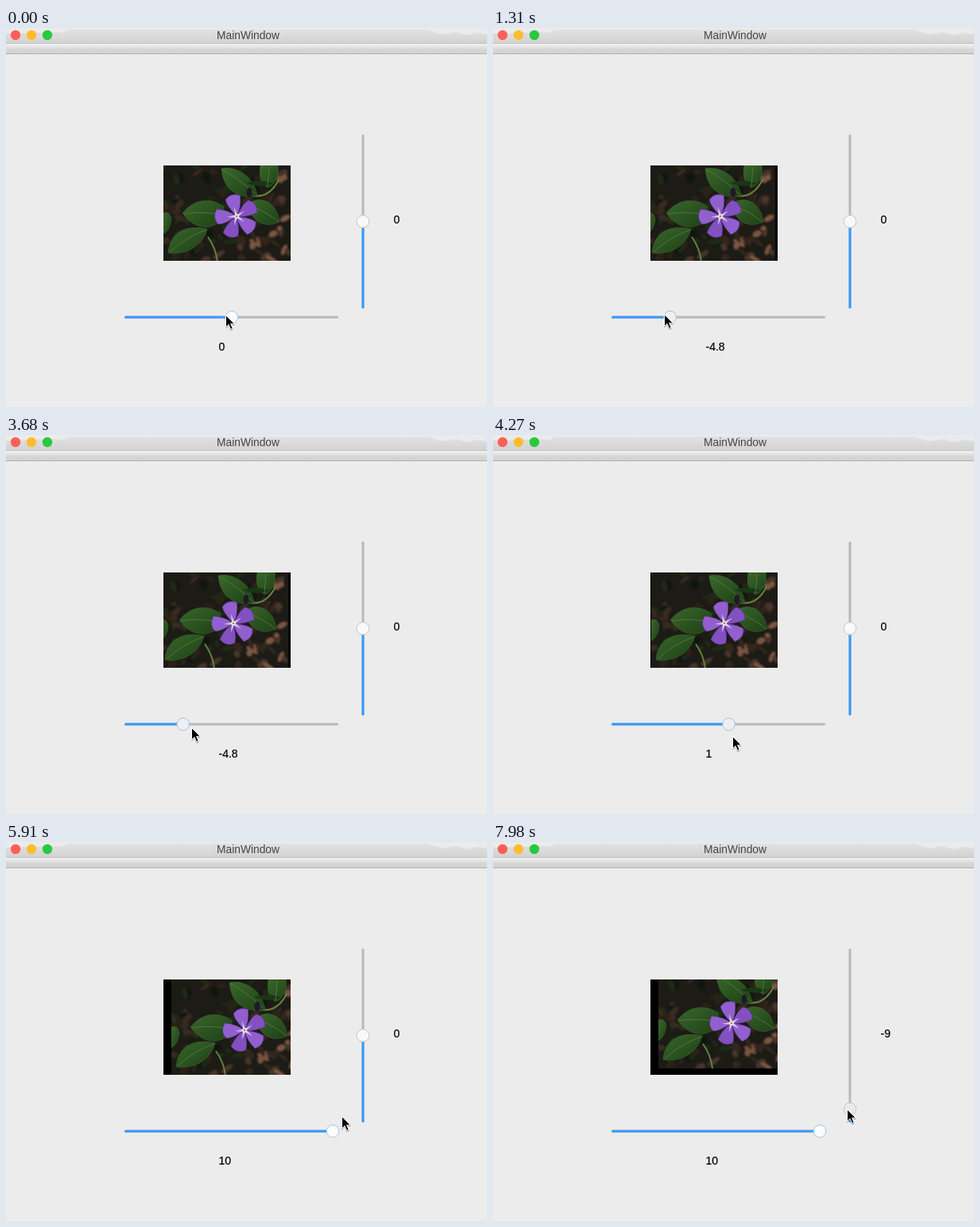
Animation, 605 px wide and 477 px high, one loop 8000 ms. Source, as an HTML page:

```html
<!DOCTYPE html>
<html lang="en">
<head>
<meta charset="utf-8">
<title>MainWindow</title>
<style>
  html, body { margin: 0; width: 100%; height: 100%; overflow: hidden; background: #ececec; }
  svg { display: block; }
  text { font: 14px "Liberation Sans", Arial, sans-serif; }
  .value { stroke: #000; stroke-width: .2; }
  .track { fill: none; stroke: #b8b8b8; stroke-width: 3; stroke-linecap: round; }
  .filled { stroke: #3b99fc; }
  .leaf { fill: url(#green); stroke: #3d6530; stroke-width: .6; }
  .vein { fill: none; stroke: #567f45; stroke-width: .8; }
  #cursor { filter: drop-shadow(0 1px .7px #0006); }
</style>
</head>
<body>
<svg width="605" height="477" viewBox="0 0 605 477">
  <defs>
    <linearGradient id="bar" x2="0" y2="1">
      <stop stop-color="#e4e4e4"/><stop offset="1" stop-color="#d1d1d1"/>
    </linearGradient>
    <linearGradient id="strip" x2="0" y2="1">
      <stop stop-color="#f3f3f3"/><stop offset=".6" stop-color="#d6d6d6"/><stop offset="1" stop-color="#d3d3d3"/>
    </linearGradient>
    <linearGradient id="green" x2="1" y2="1">
      <stop stop-color="#3a672c"/><stop offset="1" stop-color="#1d4015"/>
    </linearGradient>
    <filter id="soft"><feGaussianBlur stdDeviation="1.2"/></filter>
    <clipPath id="view"><rect x="198" y="173" width="160" height="120"/></clipPath>
    <clipPath id="edge"><rect width="161" height="121"/></clipPath>
    <path id="petal" d="M0 0C-4-7-10-15-10-23Q-2-31 9-25Q8-10 0 0Z"/>
  </defs>

  <rect width="605" height="477" fill="#ececec"/>
  <rect width="605" height="20" fill="url(#bar)"/>
  <path fill="#ebebeb" d="M0 0H605V8L592 6L580 9L566 5L550 8L538 5L530 2H78L72 6L64 5L0 7Z"/>
  <path d="M0 19.5H605" stroke="#c2c2c2"/>
  <rect y="20" width="605" height="12" fill="url(#strip)"/>
  <path d="M0 32.5H605" stroke="#b2b2b2"/>
  <circle cx="12" cy="9" r="6.2" fill="#ff5f57"/>
  <circle cx="32" cy="9" r="6.2" fill="#ffbd2e"/>
  <circle cx="52" cy="9" r="6.2" fill="#28c940"/>
  <text x="304.5" y="14" text-anchor="middle" fill="#444" style="font-size:13.8px">MainWindow</text>

  <g clip-path="url(#view)">
    <rect x="198" y="173" width="160" height="120"/>
    <g id="photo"><g clip-path="url(#edge)">
      <rect width="161" height="121" fill="#1d1b16"/>
      <g id="ground" filter="url(#soft)"></g>
      <path d="M108 37Q132 44 145 18M56 90Q66 104 68 121" fill="none" stroke="#64823f" stroke-width="2"/>
      <path class="leaf" d="M122 0Q118 19 131 28Q147 20 144 0Z"/>
      <path class="leaf" d="M73 4C92 0 114 14 118 38C93 43 75 30 73 4Z"/>
      <path class="leaf" d="M106 50C117 37 142 42 146 71C126 80 111 70 106 50Z"/>
      <path class="leaf" d="M24 60C40 40 62 41 76 52L70 72C54 82 37 78 24 60Z"/>
      <path class="leaf" d="M6 110C8 84 28 74 55 80C49 101 30 113 6 110Z"/>
      <path class="leaf" d="M0 60Q9 57 10 68Q8 82 0 86Z"/>
      <path fill="#183714" d="M104 22Q122 16 138 23Q122 29 104 22Z"/>
      <path class="vein" d="M74 5Q96 17 117 37M107 50Q126 56 145 71M26 61Q48 57 72 62M8 109Q28 90 54 81M131 26L133 2"/>
      <ellipse cx="108" cy="34" rx="3.5" ry="6" fill="#21172c"/>
      <g id="flower" transform="translate(92 64)"></g>
    </g></g>
  </g>

  <path class="track" d="M150.5 364H416.5"/>
  <path class="track filled" id="fillH"/>
  <path class="track" d="M449 135.5V351.5"/>
  <path class="track filled" id="fillV"/>
  <circle id="knobH" cy="364" r="7.8"/>
  <circle id="knobV" cx="449" r="7.8"/>
  <text class="value" id="textH" x="267.5" y="406"></text>
  <text class="value" id="textV" x="487.5" y="246"></text>
  <path id="cursor" d="M.5.5V15.5L4 12.3L6.7 18.3L9.2 17.2L6.6 11.3H11.3Z" stroke="#fff"/>
</svg>
<script>
const LOOP = 8000, STEP = 147.8, LEAD = 25;
const GRAB_V = 44, DRAG_V = 46, LAST = 54;

// Key points of the gesture: step, horizontal value, cursor x, cursor y
const path = [
  [0, 0, 276, 361],
  [9, -4.8, 215, 360],
  [16, -9.2, 163, 359],
  [19, -9.8, 154, 359],
  [25, -4.8, 233, 368],
  [34, 8.4, 386, 392],
  [36, 10, 404, 394],
  [39, 10, 404, 394],
  [43, 10, 474, 196],
  [GRAB_V, 10, 445, 243]
];

const $ = id => document.getElementById(id);
const assign = (el, attrs) => {
  for (const k in attrs) el.setAttribute(k, attrs[k]);
};
const set = (id, attrs) => assign($(id), attrs);
const add = (parent, name, attrs) => {
  const el = document.createElementNS("http://www.w3.org/2000/svg", name);
  assign(el, attrs);
  $(parent).appendChild(el);
};

function pose(step) {
  const i = path.findIndex(p => p[0] > step);
  if (i < 0) return path[path.length - 1];
  const a = path[i - 1], b = path[i], f = (step - a[0]) / (b[0] - a[0]);
  return a.map((x, j) => x + (b[j] - x) * f);
}

const fifth = v => Math.round(v * 5) / 5;
const label = v => `${+v.toFixed(1)}`;

function paintPhoto() {
  let seed = 11;
  const rnd = () => (seed = seed * 16807 % 2147483647) / 2147483647;
  const dark = ["#11130f", "#292219", "#1d2a18", "#382a20"];
  const warm = ["#7a5541", "#47352a", "#8d6851", "#30271e"];
  for (let i = 0; i < 110; i++) {
    const x = rnd() * 161, y = rnd() * 121;
    const tones = x > 138 || x + y > 185 || y > 98 && x > 50 ? warm : dark;
    add("ground", "ellipse", {
      rx: 3 + rnd() * 6, ry: 2 + rnd() * 3, fill: tones[i % 4],
      transform: `translate(${x} ${y}) rotate(${rnd() * 180})`
    });
  }
  for (let i = 0; i < 5; i++) {
    const transform = `rotate(${70 * i - 10})`;
    add("flower", "use", {
      href: "#petal", transform, fill: i % 2 ? "#8350bf" : "#925fce",
      stroke: "#5c3493", "stroke-width": .6
    });
    add("flower", "path", { d: "M-1.8 0L-1-12L1.8 0Z", transform, fill: "#dccbed" });
  }
  add("flower", "circle", { r: 2.8, fill: "#f0ead8" });
  add("flower", "circle", { r: 1.3, fill: "#a98a35" });
}

function draw(ms) {
  const step = Math.floor((ms + LEAD) / STEP);
  const [, hRaw, x, y] = pose(step);
  const pull = Math.max(0, step - DRAG_V) / (LAST - DRAG_V);
  const h = fifth(hRaw), v = fifth(-9 * pull ** 1.06);
  const kx = 283.8 + h * 12.72, ky = 243.5 - v * 10.28;
  const dragH = step > 0 && step < 36, dragV = step >= GRAB_V;

  set("photo", { transform: `translate(${198 + Math.trunc(h)} ${173 + Math.trunc(v)})` });
  set("fillH", { d: `M150.5 364H${kx}` });
  set("fillV", { d: `M449 351.5V${ky}` });
  set("knobH", { cx: kx, fill: dragH ? "#edf0f3" : "#fbfcfd", stroke: dragH ? "#a3c0dc" : "#9fc8f3" });
  set("knobV", { cy: ky, fill: dragV ? "#ebebeb" : "#f9f9f9", stroke: "#c6c6c6" });
  $("textH").textContent = label(h);
  $("textV").textContent = label(v);
  set("cursor", { transform: `translate(${Math.round(x)} ${Math.round(dragV ? ky : y)})` });
}

function tick() {
  draw(performance.now() % LOOP);
  requestAnimationFrame(tick);
}

paintPhoto();
tick();
</script>
</body>
</html>
```
